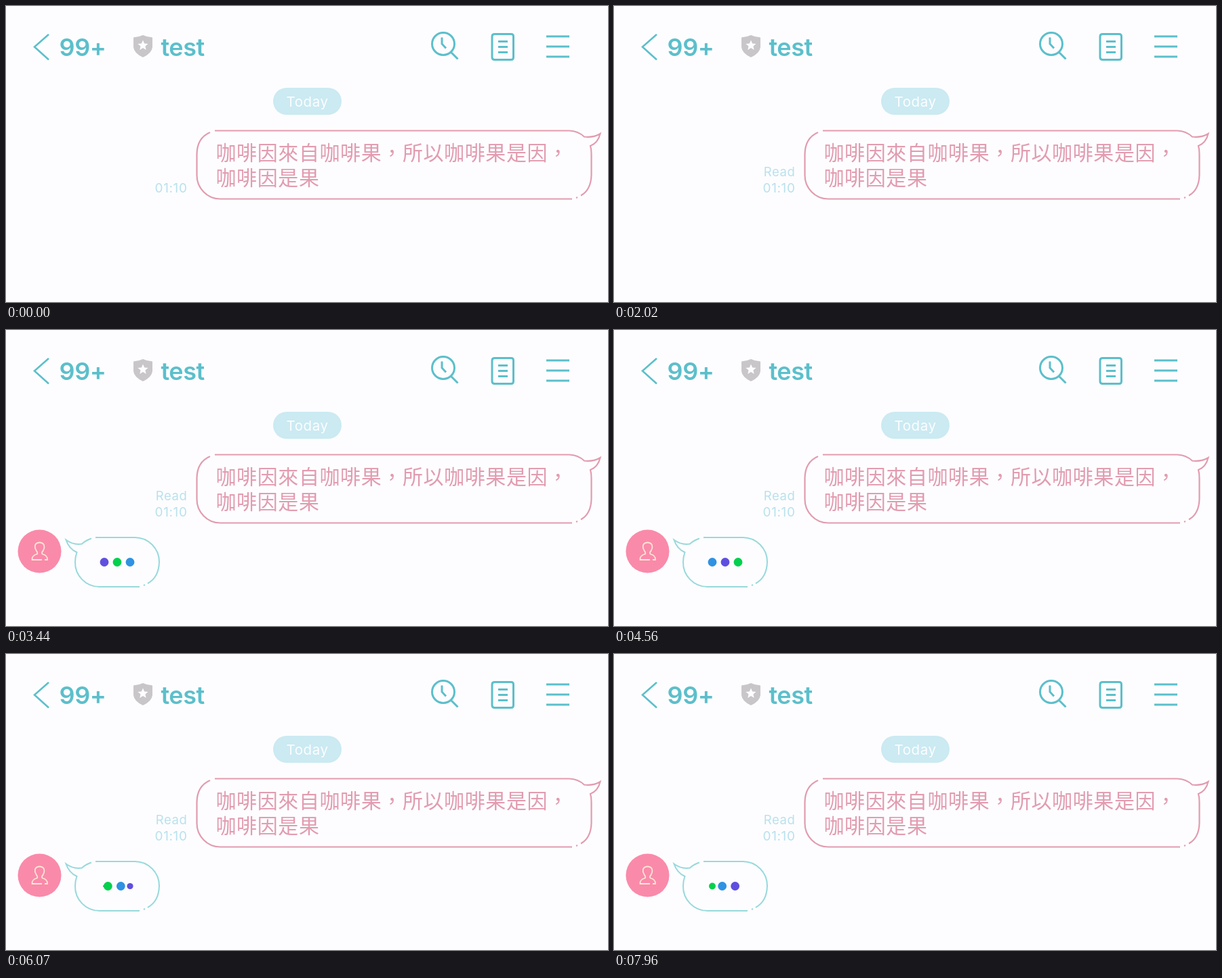
Animation of 888 by 438 pixels, one loop 7.99 s. Source, as an HTML page with a canvas:

```html
<!DOCTYPE html>
<html lang="zh-Hant">
<head>
<meta charset="utf-8">
<title>Chat</title>
<style>
html, body { margin: 0; width: 100%; height: 100%; overflow: hidden; background: #fdfdff; }
canvas { display: block; }
</style>
</head>
<body>
<canvas id="stage" width="888" height="438"></canvas>
<script>
const ctx = document.getElementById('stage').getContext('2d');
const LOOP = 7990, READ_AT = 1000, REPLY_AT = 2250;
const TEAL = '#5cbfcb', PALE = '#b9e1ec', AQUA = '#98d9dc', ROSE = '#e29cb0', PAPER = '#fdfdff';
const LATIN = 'Inter, Roboto, sans-serif';
const CJK = '"Noto Sans CJK TC", "Noto Sans CJK", sans-serif';
const DOTS = ['#5f4fdf', '#04d04e', '#2f92e2'];

// time, hold length, dot steps reached
const PACE = [
  [2000, 0, -9], [3440, 20, 0], [4560, 20, 7],
  [6070, 100, 17.35], [7280, 30, 24.69], [7960, 30, 28.69]
];

const SHAPES = {
  back: 'M63 42 L42 60.5 L63 79.5',
  shield: 'M202 43 Q208 46 216 46.5 V61 Q215 70 202 76 Q189 70 188 61 V46.5 Q196 46 202 43 Z',
  search: 'M661.5 56 A16.5 16.5 0 1 1 628.5 56 A16.5 16.5 0 1 1 661.5 56 M656.5 68.5 L666.5 78.5 M643 46.5 V56 L649 62.5',
  list: 'M721 41.5 H745 Q748.5 41.5 748.5 45 V76 Q748.5 79.5 745 79.5 H721 Q717 79.5 717 76 V45 Q717 41.5 721 41.5 Z M726 52.5 H740 M726 60.5 H740 M726 68.5 H740',
  menu: 'M797 45 H831 M797 60 H831 M797 75 H831',
  message: 'M308 184.5 H831 Q844 185 853 193.5 Q867 195 876.5 189 Q873 203 862 207 Q863.5 212 863.5 219 V250 Q863 272 848 280.5 ' +
    'M843 283 L841 284 M835 285.5 H316 A35 35 0 0 1 281.5 250 V219 Q282 195 301 187',
  reply: 'M132 307 H190 A36 36 0 0 1 226 343 Q225.5 366 209 375 M205 377 L203 378 M197 380 H138 A36 36 0 0 1 102 343 ' +
    'Q102 336 104.5 329 Q93 324 88.5 310.5 Q99 318.5 112 316.5 Q118 311 126 308.5',
  person: 'M53 340 H38.5 Q37.5 334 46 331.5 Q47 329.5 45 327 C40 319 44 314.5 49.5 314.5 C55 314.5 59 319 54.5 327 ' +
    'Q52 329.5 53.5 331.5 Q62 334 61 340 H57'
};
for (const name in SHAPES) SHAPES[name] = new Path2D(SHAPES[name]);

function line(shape, color, width) {
  ctx.strokeStyle = color;
  ctx.lineWidth = width;
  ctx.stroke(shape);
}

function disc(x, y, r, color) {
  if (r <= 0) return;
  ctx.fillStyle = color;
  ctx.beginPath();
  ctx.arc(x, y, r, 0, Math.PI * 2);
  ctx.fill();
}

function label(str, x, y, font, color, align = 'left', spacing = 0) {
  ctx.font = font;
  ctx.textAlign = align;
  ctx.letterSpacing = spacing + 'px';
  ctx.fillStyle = color;
  ctx.fillText(str, x, y);
}

function star(x, y, r) {
  ctx.beginPath();
  for (let i = 0; i < 10; i++) {
    const a = i * Math.PI / 5 - Math.PI / 2, d = i % 2 ? r * 0.45 : r;
    ctx.lineTo(x + d * Math.cos(a), y + d * Math.sin(a));
  }
  ctx.fillStyle = PAPER;
  ctx.fill();
}

function drawHeader() {
  line(SHAPES.back, TEAL, 2.6);
  label('99+', 78.5, 74, '600 36px ' + LATIN, TEAL, 'left', -0.4);
  ctx.fillStyle = '#c9c6ca';
  ctx.fill(SHAPES.shield);
  star(202, 58.5, 8);
  label('test', 228.5, 73.5, '600 36px ' + LATIN, TEAL, 'left', -0.5);
  for (const name of ['search', 'list', 'menu']) line(SHAPES[name], TEAL, 3);

  ctx.fillStyle = '#cbeaf2';
  ctx.beginPath();
  ctx.roundRect(394, 121, 101, 40, 20);
  ctx.fill();
  label('Today', 444.5, 149, '400 20.5px ' + LATIN, PAPER, 'center', 0.6);
}

function drawMessage(read) {
  line(SHAPES.message, ROSE, 2.2);
  label('咖啡因來自咖啡果，所以咖啡果是因，', 309.5, 228, '400 30px ' + CJK, ROSE, 'left', 0.6);
  label('咖啡因是果', 309.5, 265, '400 30px ' + CJK, ROSE, 'left', 0.6);
  if (read) label('Read', 267.5, 252, '400 18.5px ' + LATIN, PALE, 'right', 0.6);
  label('01:10', 267.5, 275.5, '400 19px ' + LATIN, PALE, 'right', 0.6);
}

function stepsAt(t) {
  for (let i = 0; i < PACE.length; i++) {
    const [start, hold, step] = PACE[i], next = PACE[i + 1];
    if (!next || t <= start + hold) return step;
    if (t < next[0]) {
      const from = start + hold;
      return step + (next[2] - step) * (t - from) / (next[0] - from);
    }
  }
}

// Dots shift right; the last shrinks away while it grows back at the left.
function drawDots(steps) {
  const k = Math.floor(steps), u = steps - k, e = u * u * (3 - 2 * u);
  const color = slot => DOTS[(((slot - k) % 3) + 3) % 3];
  const left = 145, gap = 19, y = 343.5, r = 6.4;
  disc(left, y, r * e, color(-1));
  disc(left + 2 * gap, y, r * (1 - e), color(2));
  for (const slot of [0, 1]) disc(left + gap * (slot + e), y, r, color(slot));
}

function drawReply(t) {
  disc(49.5, 327.5, 32, '#fa8aaa');
  line(SHAPES.person, '#fce8d4', 1.8);
  line(SHAPES.reply, AQUA, 2);
  drawDots(stepsAt(t));
}

function render(t) {
  ctx.fillStyle = PAPER;
  ctx.fillRect(0, 0, 888, 438);
  drawHeader();
  drawMessage(t >= READ_AT);
  if (t >= REPLY_AT) drawReply(t);
}

let begin;
function tick(now) {
  begin ??= now;
  render(Math.max(0, now - begin) % LOOP);
  requestAnimationFrame(tick);
}
render(0);
requestAnimationFrame(tick);
</script>
</body>
</html>
```
